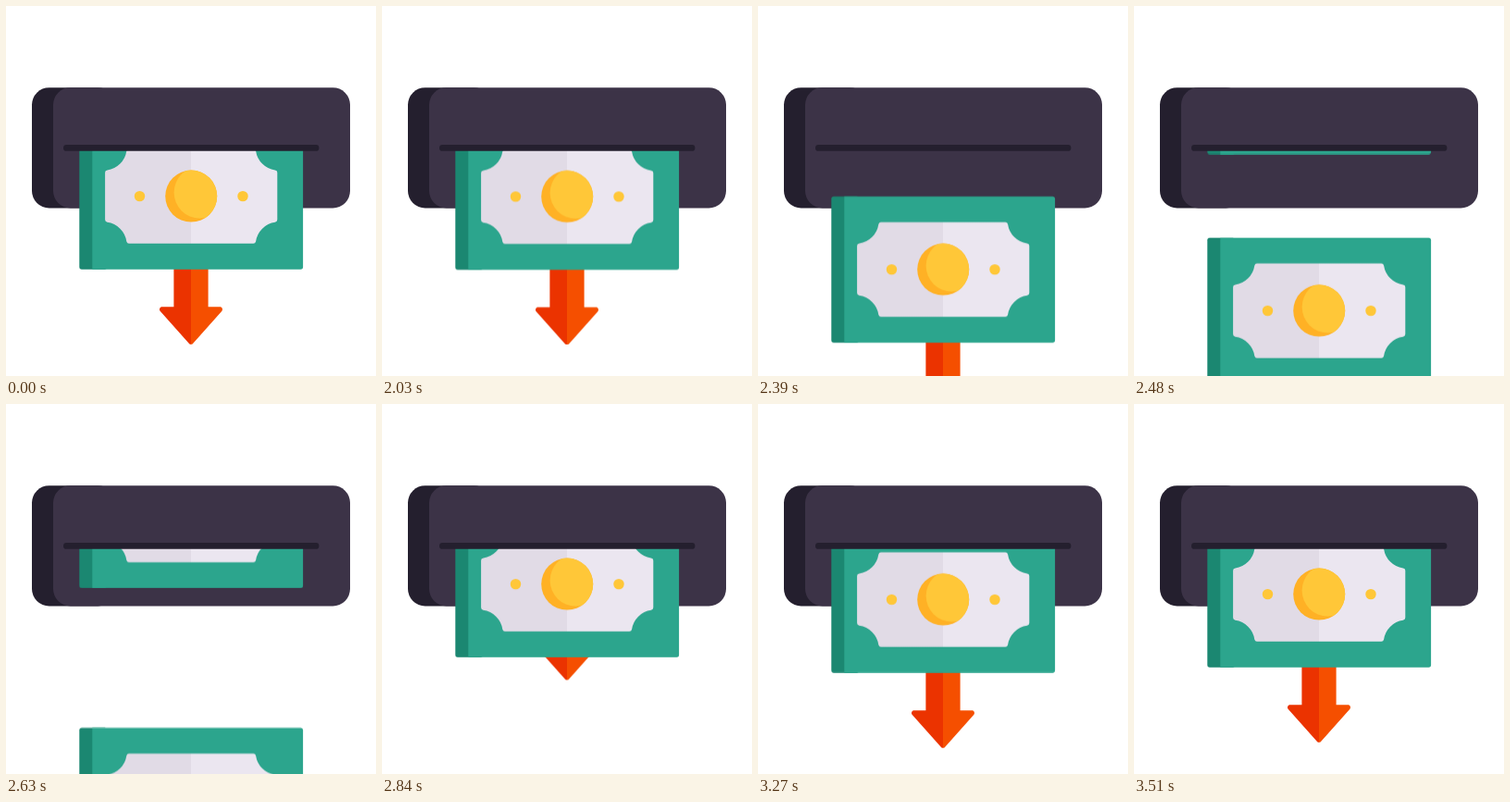
An HTML page for the animation above (3540 ms loop, 400 px wide and 400 px high).

```html
<!DOCTYPE html>
<html lang="en">
<head>
<meta charset="utf-8">
<title>Cash withdrawal</title>
<style>
  html, body { margin: 0; width: 100%; height: 100%; overflow: hidden; background: #fff; }
  svg { display: block; width: 100%; height: 100%; }

  .leave, .bill, .arrow { animation: 3540ms linear infinite; }
  .leave { animation-name: leave; }
  .bill { animation-name: bill; }
  .arrow { animation-name: arrow; }

  /* 2000 to 2700 ms: the cash drops out of view */
  @keyframes leave {
    0% { transform: translateY(0); }
    56.497% { transform: translateY(0); animation-timing-function: cubic-bezier(.36, 0, .68, .3); }
    76.271%, 100% { transform: translateY(280.3px); }
  }
  /* 2380 to 3020 ms: the next bill slides out, then settles by 3500 ms */
  @keyframes bill {
    0% { transform: translateY(-131.7px); }
    67.232% { transform: translateY(-131.7px); animation-timing-function: ease-in-out; }
    85.311% { transform: translateY(12.5px); animation-timing-function: ease-in-out; }
    98.87%, 100% { transform: translateY(0); }
  }
  /* 2370 to 3152 ms: its arrow follows from further up */
  @keyframes arrow {
    0% { transform: translateY(-222px); }
    66.949% { transform: translateY(-222px); animation-timing-function: ease-in-out; }
    89.04% { transform: translateY(8px); animation-timing-function: ease-in-out; }
    98.87%, 100% { transform: translateY(0); }
  }
</style>
</head>
<body>
<svg viewBox="0 0 400 400">
  <defs>
    <linearGradient id="paper">
      <stop offset=".5" stop-color="#e1dbe6"/>
      <stop offset=".5" stop-color="#ebe6f0"/>
    </linearGradient>
    <linearGradient id="red">
      <stop offset=".5" stop-color="#eb3300"/>
      <stop offset=".5" stop-color="#f54f00"/>
    </linearGradient>
    <clipPath id="below"><path d="M0 153.5H400V400H0Z"/></clipPath>
    <clipPath id="coin"><circle cx="200.2" cy="205.6" r="28"/></clipPath>

    <g id="bill">
      <rect x="79.3" y="126.7" width="30" height="158" rx="2.6" fill="#1b8771"/>
      <path d="M93.3 126.7H318.5a2.6 2.6 0 0 1 2.6 2.6V282.1a2.6 2.6 0 0 1-2.6 2.6H93.3Z" fill="#2ca58d"/>
      <path fill="url(#paper)" d="M133 154.4H267.4q2.2 0 2.7 2.3a24.5 24.5 0 0 0 20.8 20.7q2.4 .4 2.4 2.7V231.1q0 2.3-2.4 2.7a24.5 24.5 0 0 0-20.8 20.7q-.5 2.3-2.7 2.3H133q-2.2 0-2.7-2.3a24.5 24.5 0 0 0-20.8-20.7q-2.4-.4-2.4-2.7V180.1q0-2.3 2.4-2.7a24.5 24.5 0 0 0 20.8-20.7q.5-2.3 2.7-2.3Z"/>
      <circle cx="200.2" cy="205.6" r="28" fill="#ffb125"/>
      <g fill="#ffc738">
        <circle cx="209.6" cy="201.6" r="28" clip-path="url(#coin)"/>
        <circle cx="144.5" cy="205.6" r="5.7"/>
        <circle cx="256" cy="205.6" r="5.7"/>
      </g>
    </g>

    <path id="arrow" fill="url(#red)" d="M181.4 250H218.6V325.3H231.2c2.6 0 3.7 2.8 2 4.7L202 364.9a2.6 2.6 0 0 1-4 0L166.8 330c-1.7-1.9-.6-4.7 2-4.7H181.4Z"/>
  </defs>

  <rect x="28" y="88.2" width="90" height="130.2" rx="18.6" fill="#241f2e"/>
  <rect x="51" y="88.2" width="321" height="130.2" rx="18.6" fill="#3c3347"/>

  <g clip-path="url(#below)">
    <g class="arrow"><use href="#arrow"/></g>
    <g class="bill"><use href="#bill"/></g>
    <g class="leave">
      <use href="#arrow"/>
      <use href="#bill"/>
    </g>
  </g>

  <rect x="62" y="150" width="276.4" height="6.8" rx="3.4" fill="#241f2e"/>
</svg>
</body>
</html>
```
